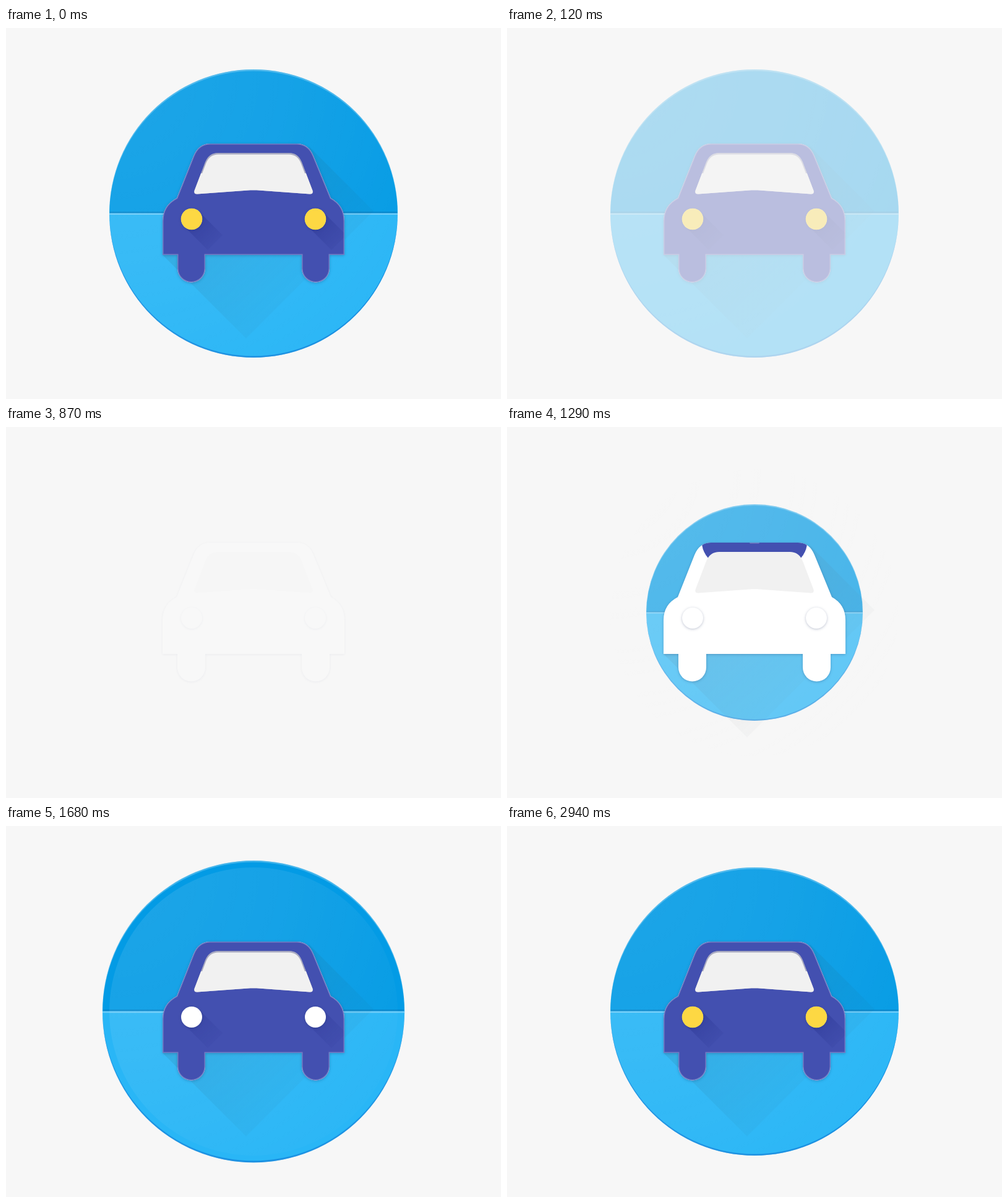
Recreate the animation shown at these times as an HTML page. Size 800x600 px, loop 2970 ms.

```html
<!DOCTYPE html>
<html lang="en">
<head>
<meta charset="utf-8">
<title>Car icon</title>
<style>
  html, body { margin: 0; width: 100%; height: 100%; overflow: hidden; background: #f7f7f7; }
  svg { display: block; width: 800px; height: 600px; }

  /* 99 ticks of 30 ms; the small lead keeps step edges off the tick itself */
  .icon, .disc, .grow, .reveal, .rim, .glow, .lamp {
    animation: 2970ms linear -2ms infinite;
  }
  .icon   { animation-name: icon; }
  .disc   { animation-name: disc; }
  .grow   { animation-name: grow; transform-origin: 400px 300px; }
  .reveal { animation-name: reveal; }
  .rim    { animation-name: rim; }
  .glow   { animation-name: glow; }
  .lamp   { animation-name: lamp; transform-box: fill-box; transform-origin: center; }
  .paper  { filter: drop-shadow(0 1px 2px rgba(20, 40, 90, .28)); }

  @keyframes icon {
    0% { opacity: 1; animation-timing-function: steps(6); }
    6.0606%, 28.283% { opacity: 0; }
    28.283% { animation-timing-function: steps(6); }
    34.343%, 100% { opacity: 1; }
  }
  @keyframes disc {
    0%, 6.0606% { opacity: 1; }
    6.07%, 39.394% { opacity: 0; }
    39.394% { animation-timing-function: steps(4); }
    43.434% { opacity: .74; animation-timing-function: steps(2); }
    45.455%, 100% { opacity: 1; }
  }
  @keyframes grow {
    0%, 6.0606% { transform: scale(1); }
    6.07%, 39.394% { transform: scale(0); }
    39.394% { animation-timing-function: steps(4); }
    43.434% { transform: scale(.751); animation-timing-function: steps(3); }
    46.465% { transform: scale(1.058); animation-timing-function: steps(2); }
    48.485% { transform: scale(1.092); animation-timing-function: steps(2); }
    50.505% { transform: scale(1.106); animation-timing-function: steps(4); }
    54.545% { transform: scale(1.075); animation-timing-function: steps(4); }
    58.586% { transform: scale(1.02); animation-timing-function: steps(4); }
    62.626%, 100% { transform: scale(1); }
  }
  @keyframes reveal {
    0%, 6.0606% { rx: 260px; ry: 400px; }
    6.07%, 40.404% { rx: 0px; ry: 0px; }
    40.404% { animation-timing-function: steps(3); }
    43.434% { rx: 85px; ry: 53px; animation-timing-function: steps(5); }
    48.485% { rx: 154px; ry: 270px; animation-timing-function: steps(4); }
    52.525%, 100% { rx: 260px; ry: 400px; }
  }
  @keyframes rim {
    0%, 6.0606% { rx: 260px; ry: 400px; }
    6.07%, 42.424% { rx: 0px; ry: 0px; }
    42.424% { animation-timing-function: steps(1); }
    43.434% { rx: 8px; ry: 4px; animation-timing-function: steps(5); }
    48.485% { rx: 60px; ry: 17px; animation-timing-function: steps(8); }
    56.566%, 100% { rx: 260px; ry: 400px; }
  }
  @keyframes glow {
    0%, 6.0606% { opacity: 1; }
    6.07%, 50.505% { opacity: 0; }
    50.505% { animation-timing-function: steps(10); }
    60.606%, 100% { opacity: 1; }
  }
  @keyframes lamp {
    0%, 6.0606% { transform: scale(1); }
    6.07%, 62.626% { transform: scale(0); }
    62.626% { animation-timing-function: steps(7); }
    69.697% { transform: scale(.72); animation-timing-function: steps(6); }
    75.758%, 100% { transform: scale(1); }
  }
</style>
</head>
<body>
<svg viewBox="0 0 800 600" aria-label="Car icon">
  <defs>
    <path id="car" d="M276 275L303 207Q311 187 330 187H470Q489 187 497 207L525 275Q547 287 547 312V367H523V389A22.5 22.5 0 0 1 478 389V367H322V389A22.5 22.5 0 0 1 277 389V367H253V312Q253 287 276 275Z"/>
    <path id="pane" d="M304.500 263L322 217Q328 202 343 202H457Q472 202 478 217L495.500 263Q497 268.500 491 268.500L405 262.300Q400 262 395 262.300L309 268.500Q303 268.500 304.500 263Z"/>
    <path id="beam" d="M288 321L326 359L350 335L312 297Z"/>
    <clipPath id="carClip"><use href="#car"/></clipPath>
    <clipPath id="paneClip"><use href="#pane"/></clipPath>
    <clipPath id="revealClip"><ellipse class="reveal" cx="400" cy="187" rx="260" ry="400"/></clipPath>
    <clipPath id="rimClip"><ellipse class="rim" cx="400" cy="187" rx="260" ry="400"/></clipPath>
    <radialGradient id="finish" gradientUnits="userSpaceOnUse" cx="167" cy="67" r="640">
      <stop offset="0" stop-color="#fff" stop-opacity=".11"/>
      <stop offset=".45" stop-color="#fff" stop-opacity=".075"/>
      <stop offset="1" stop-color="#fff" stop-opacity="0"/>
    </radialGradient>
    <linearGradient id="cast" gradientUnits="userSpaceOnUse" x1="310" y1="310" x2="445" y2="445">
      <stop offset="0" stop-color="#263238" stop-opacity=".1"/>
      <stop offset="1" stop-color="#263238" stop-opacity=".03"/>
    </linearGradient>
    <linearGradient id="beamFade" gradientUnits="userSpaceOnUse" x1="300" y1="309" x2="338" y2="347">
      <stop offset="0" stop-color="#1a237e" stop-opacity=".3"/>
      <stop offset="1" stop-color="#1a237e" stop-opacity=".06"/>
    </linearGradient>
  </defs>

  <g class="icon">
    <g class="disc">
      <g class="grow">
        <path d="M167 300A233 233 0 0 1 633 300Z" fill="#039be5"/>
        <path d="M167 300A233 233 0 0 0 633 300Z" fill="#29b6f6"/>
        <path d="M167 300A233 233 0 0 1 633 300V302.500A233 233 0 0 0 167 302.500Z" fill="#fff" opacity=".25"/>
        <path d="M167 300A233 233 0 0 0 633 300V297.500A233 233 0 0 1 167 297.500Z" fill="#0d6fd0" opacity=".55"/>
        <path d="M168 297H632V299.500H168Z" fill="#0277bd" opacity=".6"/>
        <path d="M167 299.500H633V302H167Z" fill="#7dd3fb" opacity=".8"/>
      </g>
      <circle cx="400" cy="300" r="233" fill="url(#finish)"/>
      <path d="M253 367L388 502L594 296L490 192L330 290Z" fill="url(#cast)"/>
    </g>

    <use class="paper" href="#car" fill="#fff"/>

    <g clip-path="url(#revealClip)">
      <use href="#car" fill="#4350b0"/>
    </g>

    <g class="glow" clip-path="url(#carClip)" fill="url(#beamFade)">
      <use href="#beam"/>
      <use href="#beam" x="200"/>
    </g>

    <use href="#pane" fill="#f1f1f1"/>

    <g clip-path="url(#rimClip)">
      <g clip-path="url(#carClip)">
        <use href="#car" fill="none" stroke="#fff" stroke-opacity=".25" stroke-width="3"/>
      </g>
      <g clip-path="url(#paneClip)">
        <use href="#pane" y="1" fill="none" stroke="#3c3f78" stroke-opacity=".4" stroke-width="3"/>
        <path d="M300 235H500V275H300Z" fill="#f1f1f1"/>
      </g>
    </g>

    <g class="paper" fill="#fff">
      <circle cx="300" cy="309" r="17"/>
      <circle cx="500" cy="309" r="17"/>
    </g>
    <g fill="#fdd843">
      <circle class="lamp" cx="300" cy="309" r="17.300"/>
      <circle class="lamp" cx="500" cy="309" r="17.300"/>
    </g>
  </g>
</svg>
</body>
</html>
```
